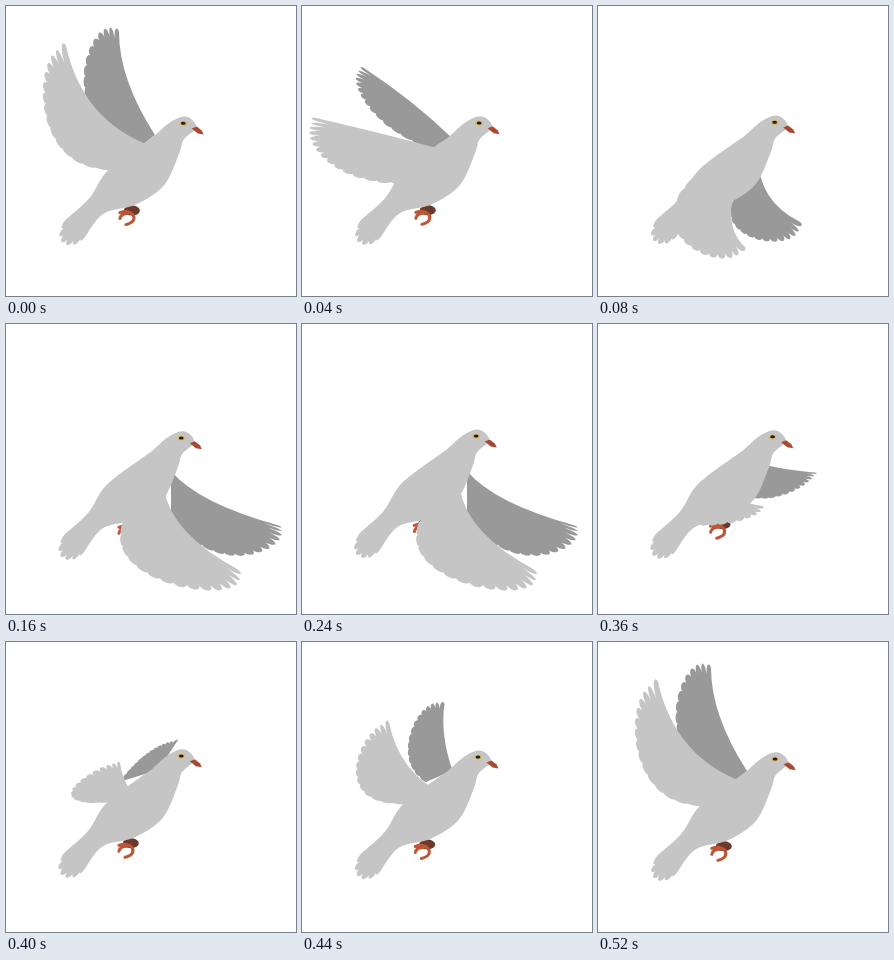
An HTML page with a canvas that plays this animation: 290x290 px, repeating every 0.56 s.

```html
<!DOCTYPE html>
<html lang="en">
<head>
<meta charset="utf-8">
<title>Flying dove</title>
<style>
html, body { margin: 0; width: 100%; height: 100%; overflow: hidden; background: #fff; }
canvas { display: block; width: 290px; height: 290px; }
</style>
</head>
<body>
<canvas id="stage" width="290" height="290"></canvas>
<script>
const ctx = document.getElementById('stage').getContext('2d');
const STEP = 40, STEPS = 14;
const LIGHT = '#c5c5c5', SHADE = '#999999';

// A wing is a leading edge (root, bend, tip) and a feathered cubic edge (tip, c1, c2, end).
const raised = {
  near: [[145, 140], [77, 115], [60, 40], [25, 40], [21, 167], [106, 164]],
  far: [[149, 129], [113, 73], [113, 26], [87, -5], [38, 120], [135, 140]]
};
const spread = {
  near: [[145, 145], [96, 131], [14, 112], [-8, 125], [20, 180], [105, 178]],
  far: [[150, 132], [112, 95], [62, 62], [38, 65], [65, 125], [135, 145]]
};
const lowered = {
  near: [[150, 150], [118, 215], [147, 241], [134, 278], [13, 224], [115, 155]],
  far: [[160, 150], [160, 195], [202, 216], [210, 252], [103, 238], [140, 185]]
};
const forward = {
  near: [[158, 165], [165, 209], [231, 245], [262, 288], [88, 266], [117, 198]],
  far: [[165, 147], [192, 179], [271, 201], [300, 217], [211, 268], [165, 190]]
};
const folded = {
  near: [[140, 165], [118, 148], [114, 121], [98, 116], [15, 169], [108, 160]],
  far: [[152, 128], [163, 112], [172, 98], [150, 100], [130, 118], [113, 140]]
};
const slide = (wing, dx) => wing.map(([x, y]) => [x + dx, y - 2]);
const swept = { near: slide(forward.near, -16), far: slide(forward.far, -9) };

const keys = [[0, raised], [1, spread], [2, lowered], [4, forward], [6, forward],
              [8, swept], [10, folded], [12, raised], [14, raised]];

const mix = (a, b, k) => a.map((v, i) => v + (b[i] - v) * k);
const mixWing = (a, b, k) => a.map((p, i) => mix(p, b[i], k));

function cubicAt([a, b, c, d], u) {
  const v = 1 - u;
  return [0, 1].map(i =>
    v * v * v * a[i] + 3 * v * v * u * b[i] + 3 * v * u * u * c[i] + u * u * u * d[i]);
}

// Rounded feathers along a cubic, with slits cut towards the hub.
function addFeathers(edge, hub, count, slitAt) {
  const pulled = (u, k) => mix(cubicAt(edge, u), hub, k);
  for (let i = 0; i < count; i++) {
    const from = i / count, to = (i + 1) / count, inset = .12 / count;
    const slit = slitAt(to);
    ctx.bezierCurveTo(...pulled(from + inset, -slit / 3), ...pulled(to - inset, -slit / 3),
      ...pulled(to, i < count - 1 ? slit : 0));
  }
}

function addCurve(points) {
  const at = i => points[Math.max(0, Math.min(points.length - 1, i))];
  for (let i = 0; i < points.length - 1; i++) {
    const [p, a, b, q] = [at(i - 1), at(i), at(i + 1), at(i + 2)];
    ctx.bezierCurveTo(a[0] + (b[0] - p[0]) / 6, a[1] + (b[1] - p[1]) / 6,
      b[0] - (q[0] - a[0]) / 6, b[1] - (q[1] - a[1]) / 6, ...b);
  }
}

function fillShape(color, trace) {
  ctx.fillStyle = color;
  ctx.beginPath();
  trace();
  ctx.fill();
}

const polygon = (color, ...points) =>
  fillShape(color, () => points.forEach(p => ctx.lineTo(...p)));

const ellipse = (color, x, y, rx, ry) =>
  fillShape(color, () => ctx.ellipse(x, y, rx, ry, 0, 0, Math.PI * 2));

function drawWing([root, bend, ...edge], color) {
  fillShape(color, () => {
    ctx.moveTo(...root);
    ctx.quadraticCurveTo(...bend, ...edge[0]);
    addFeathers(edge, bend, 15, u => .035 + .22 * (1 - u) ** 3);
  });
}

function drawBody() {
  const front = [[148, 131], [164, 117], [178, 111], [187, 115], [190, 123], [178, 134], [173, 149],
                 [158, 180], [130, 199], [98, 208], [80, 230]];
  const tail = [front.at(-1), [68, 250], [40, 238], [60, 214]];
  const back = [tail[3], [84, 192], [103, 164], front[0]];
  fillShape(LIGHT, () => {
    ctx.moveTo(...front[0]);
    addCurve(front);
    addFeathers(tail, [85, 205], 6, () => .13);
    addCurve(back);
  });
}

function drawFeet() {
  ellipse('#6b3a2a', 126, 205, 8, 5);
  ctx.strokeStyle = '#bb5638';
  ctx.lineWidth = 3;
  ctx.lineCap = 'round';
  ctx.beginPath();
  ctx.moveTo(114, 207);
  ctx.quadraticCurveTo(122, 204, 127, 209);
  ctx.quadraticCurveTo(131, 216, 120, 219);
  ctx.moveTo(122, 208);
  ctx.quadraticCurveTo(115, 208, 114, 213);
  ctx.stroke();
}

function drawFace() {
  polygon('#a84a32', [186, 123], [191, 121], [196, 125], [198, 129], [192, 128]);
  ellipse('#d8b65c', 177.5, 117.8, 3.6, 2.3);
  ellipse('#2a1a10', 177.5, 117.6, 2.4, 1.5);
}

function wingsAt(step) {
  const i = keys.findIndex(([at]) => at > step);
  const [[from, a], [to, b]] = [keys[i - 1], keys[i]];
  const k = (step - from) / (to - from);
  return { near: mixWing(a.near, b.near, k), far: mixWing(a.far, b.far, k) };
}

// The body rises and leans back, the head moving more than the tail.
function onBody(rise, draw) {
  ctx.save();
  ctx.transform(1, 0, -rise / 300, 1, rise, rise);
  draw();
  ctx.restore();
}

function render(now) {
  const step = Math.floor(now / STEP) % STEPS;
  const wings = wingsAt(step);
  const rise = -.4 - 2.7 * (1 - Math.cos(2 * Math.PI * step / STEPS));
  ctx.fillStyle = '#fff';
  ctx.fillRect(0, 0, 290, 290);
  drawWing(wings.far, SHADE);
  onBody(rise, () => { drawFeet(); drawBody(); });
  drawWing(wings.near, LIGHT);
  onBody(rise, drawFace);
}

const start = performance.now();
function tick() {
  render(performance.now() - start);
  requestAnimationFrame(tick);
}
tick();
</script>
</body>
</html>
```
